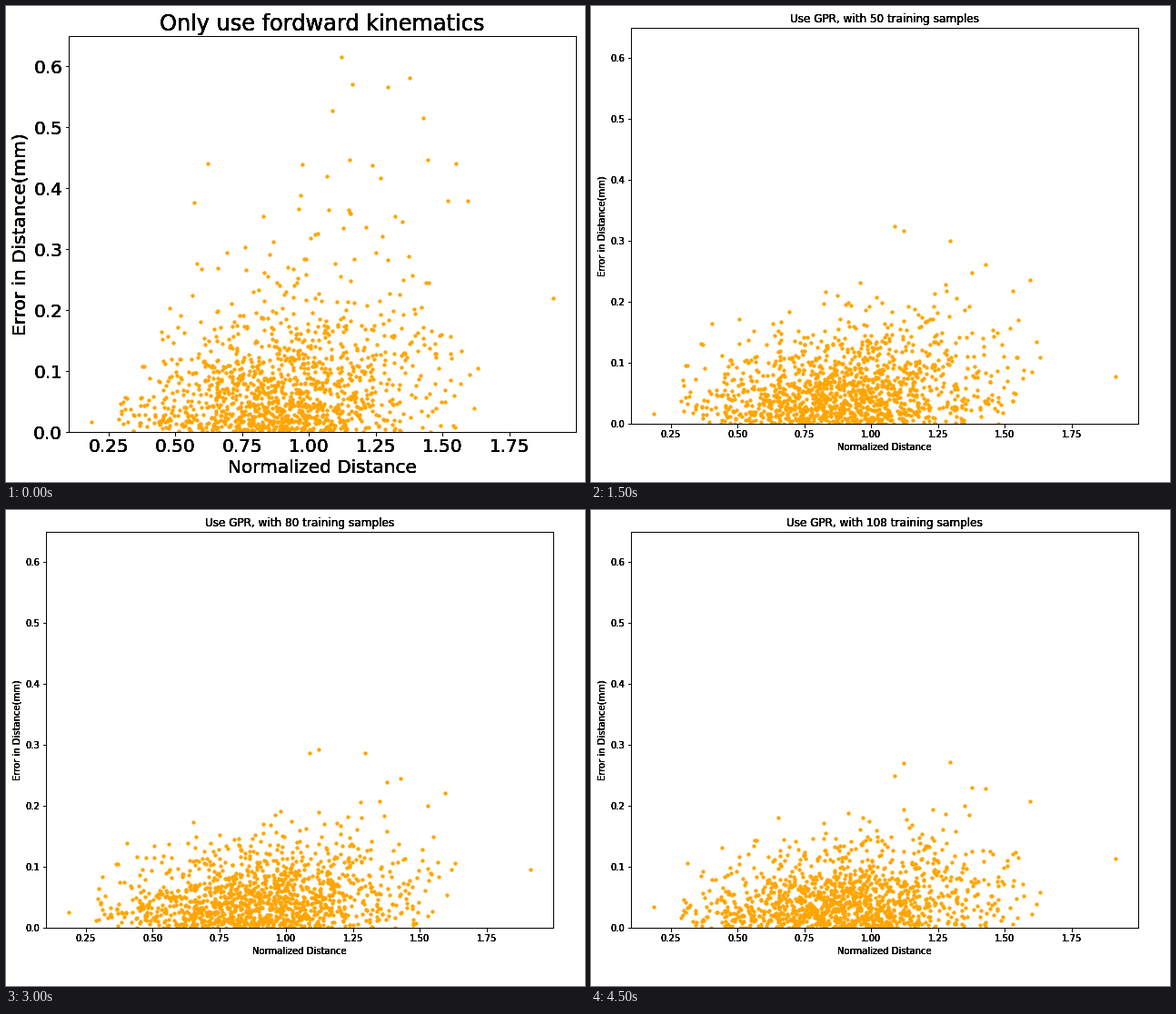
Animation, 637 px wide and 523 px high, one loop 5 s. Source, as a matplotlib script:

```python
import numpy as np
import matplotlib.pyplot as plt
from matplotlib.animation import FuncAnimation

W, H, DPI = 637, 523, 72
FRAMES, INTERVAL = 10, 500
COUNT = 1250
TEXT_LAYERS = 5  # stacked copies give the heavy, crisp lettering

plt.rcParams["font.family"] = "DejaVu Sans"

# Stand-out points: x, error untrained, with fewest and with most samples
KEY_POINTS = np.array([
    (1.087, .527, .350, .250),
    (1.122, .615, .332, .270),
    (1.294, .567, .310, .272),
    (1.376, .582, .255, .230),
    (1.428, .515, .272, .229),
    (1.594, .379, .245, .207),
    (1.915, .220, .065, .114),
    (0.187, .017, .010, .034),
])


def soften(y, limit):
    """Pull errors above the limit back towards it."""
    return np.where(y > limit, limit + .3 * (y - limit), y)


def make_errors():
    rng = np.random.default_rng(12)
    x = rng.normal(.9, .275, COUNT * 2)
    x = x[(x > .285) & (x < 1.645)][:COUNT]
    z = rng.normal(size=x.size)
    spread = np.exp(.45 * rng.normal(size=x.size))
    steps = [soften((.02 + .083 * x) * np.abs(z) * spread, .42)]

    # The signed error drifts, and both drift and size settle with training
    for step in range(1, FRAMES):
        keep = .97 - .45 * np.exp(-.8 * (step - 1))
        scale = .8 + .2 * np.exp(-((step - 1) / 3.5) ** 2)
        z = keep * z + np.sqrt(1 - keep ** 2) * rng.normal(size=x.size)
        steps.append(soften(scale * (.048 + .034 * x) * np.abs(z), .24 * scale))

    key_x, before, early, late = KEY_POINTS.T
    progress = np.linspace(0, 1, FRAMES - 1)[:, None]
    keys = np.vstack([before, early + (late - early) * progress])
    return np.append(x, key_x), np.hstack([steps, keys])


X, ERRORS = make_errors()
fig = plt.figure(figsize=(W / DPI, H / DPI), dpi=DPI, facecolor="white")


def add_axes(left, bottom, size, title):
    ax = fig.add_axes([left / W, bottom / H, 558 / W, 435 / H],
                      facecolor="none")
    ax.set_xlim(.1005, 1.9995)
    ax.set_ylim(0, .65)
    ax.set_xticks(np.arange(1, 8) / 4)
    ax.set_yticks(np.arange(7) / 10)
    ax.tick_params(labelsize=size)
    ax.set_title(title, fontsize=1.2 * size)
    ax.set_xlabel("Normalized Distance", fontsize=size)
    ax.set_ylabel("Error in Distance(mm)", fontsize=size)
    return ax


def draw(step):
    fig.clear()
    if step == 0:
        layout = (69, 55, 20, "Only use fordward kinematics")
    else:
        samples = min(20 + 10 * step, 108)
        layout = (44, 64, 10, f"Use GPR, with {samples} training samples")
    layers = [add_axes(*layout) for _ in range(TEXT_LAYERS)]
    layers[0].scatter(X, ERRORS[step], s=11, color="orange")
    return layers


anim = FuncAnimation(fig, draw, frames=FRAMES, init_func=lambda: draw(0),
                     interval=INTERVAL, repeat=True, repeat_delay=0)
plt.show()
```
